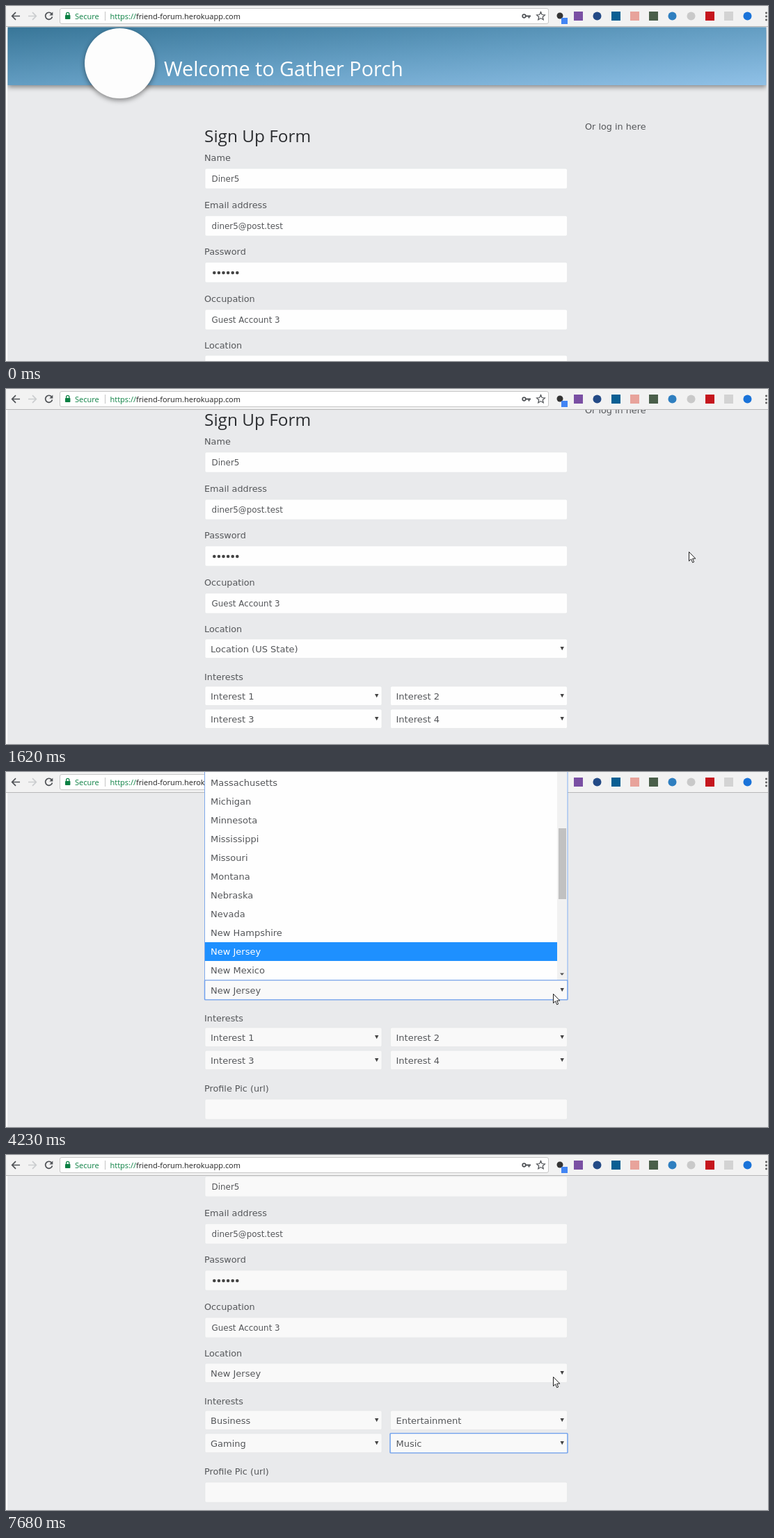
An HTML page that plays this animation: 1095x511 px, repeating every 8000 ms.

```html
<!DOCTYPE html>
<html lang="en">
<head>
<meta charset="utf-8">
<title>Sign up</title>
<style>
  html, body { margin: 0; width: 100%; height: 100%; overflow: hidden; background: #fff; }
  svg { display: block; width: 1095px; height: 511px; }
  text { font-family: "DejaVu Sans", Verdana, sans-serif; fill: #55575a; white-space: pre; }
  .label { font-size: 12.8px; }
  .input { font-size: 11.9px; }
  .select { font-size: 13px; }
  .ui { font: 11px "Open Sans", "Noto Sans", sans-serif; fill: #222; }
  .head { font: 24.4px "Open Sans", "Noto Sans", sans-serif; fill: #2b2d30; }
  .title { font: 28.8px "Open Sans", "Noto Sans", sans-serif; fill: #fff; }
  .secure { fill: #0b8043; }
  .box { stroke: #e2e4e6; stroke-width: .6; }
  .line { fill: none; stroke: #505357; stroke-width: 1.7; }
  .banner, .badge { filter: drop-shadow(0 3px 3.5px rgba(0, 0, 0, .42)); }
  .focus { fill: none; stroke: #6c9fee; stroke-width: 1.4; }
</style>
</head>
<body>
<svg viewBox="0 0 1095 511">
  <defs>
    <linearGradient id="sky" x1="0" y1="0" x2="1" y2="1">
      <stop offset="0" stop-color="#387698"/>
      <stop offset=".5" stop-color="#639dc2"/>
      <stop offset="1" stop-color="#90c1e7"/>
    </linearGradient>
    <clipPath id="view"><rect x="2" y="30" width="1091" height="481"/></clipPath>
  </defs>
  <rect x="2" y="30" width="1093" height="481" fill="#e9eaec"/>
  <g clip-path="url(#view)">
    <g id="page">
      <rect class="banner" x="2.5" y="30.5" width="1090" height="83.5" fill="url(#sky)"/>
      <circle class="badge" cx="163.5" cy="82.5" r="50.5" fill="#fdfdfd"/>
      <text class="title" x="227" y="101">Welcome to Gather Porch</text>
      <text class="label" x="832" y="178">Or log in here</text>
      <text class="head" x="285" y="196">Sign Up Form</text>
    </g>
  </g>

  <g id="toolbar">
    <rect width="1095" height="29" fill="#f2f2f2"/>
    <rect y="29" width="1095" height="1" fill="#b8b8b8"/>
    <rect x="77.5" y="3.5" width="702" height="22" rx="2.5" fill="#fff" stroke="#c6c6c6"/>
    <path class="line" d="M20 14.5H9M14 9.2l-5.3 5.3 5.3 5.3"/>
    <path class="line" style="stroke:#cbcdcf" d="M32 14.5h11M38 9.2l5.3 5.3-5.3 5.3"/>
    <path class="line" d="M65.6 11.2a5 5 0 1 0 .9 4.3"/>
    <path d="M67.3 8.6v5h-5z" fill="#505357"/>
    <rect x="85" y="13" width="7.4" height="6" rx=".7" fill="#0b8043"/>
    <path class="line" style="stroke:#0b8043;stroke-width:1.3" d="M86.6 13v-1.6a2.1 2.1 0 0 1 4.2 0V13"/>
    <text class="ui secure" x="99" y="18.5">Secure</text>
    <path d="M142.5 8v13" stroke="#c4c4c4"/>
    <text class="ui" x="149.5" y="18.5"><tspan class="secure">https://</tspan>friend-forum.herokuapp.com</text>
    <circle class="line" cx="744.5" cy="14.5" r="2.3"/>
    <path class="line" style="stroke-width:2" d="M747 14.5h7M751.5 14.5v3"/>
    <path class="line" style="stroke-width:1.2" d="M768.5 8.6l1.7 3.9 4.2.4-3.2 2.8 1 4.1-3.7-2.2-3.7 2.2 1-4.1-3.2-2.8 4.2-.4z"/>
    <circle cx="796" cy="14" r="4.5" fill="#333"/>
    <rect x="798" y="17" width="9" height="9" fill="#4285f4"/>
    <g fill="#555"><circle cx="1092.5" cy="10" r="1.4"/><circle cx="1092.5" cy="15" r="1.4"/><circle cx="1092.5" cy="20" r="1.4"/></g>
  </g>

  <g id="popup">
    <rect x="285.5" y="-2" width="521.5" height="301.5" fill="#fefefe" stroke="#7fa9ea"/>
    <rect id="pick" x="286" width="506" height="27" fill="#1e90ff"/>
    <rect x="792" width="14" height="299" fill="#f1f1f1"/>
    <rect id="thumb" x="794" width="11" height="102" fill="#c1c1c1"/>
    <path d="M796 289.5h6l-3 3.2z" fill="#505050"/>
  </g>
  <path id="cursor" d="M.5 .5v13.2l3-2.9 2.2 5 2-.9-2.1-4.8h4.2z" fill="#fff" stroke="#222" stroke-width="1"/>
</svg>
<script>
const LOOP = 8000, TICK = 30;
const $ = id => document.getElementById(id);

function add(parent, tag, attrs, text = '') {
  const node = document.createElementNS('http://www.w3.org/2000/svg', tag);
  for (const key in attrs) node.setAttribute(key, attrs[key]);
  node.textContent = text;
  return parent.appendChild(node);
}

// Toolbar buttons: x, colour, shape
[[822, '#7a4fa3', 1], [849, '#234a86', 0], [876, '#0a5f93', 1], [903, '#e8a39b', 1],
 [930, '#4a5f4a', 1], [957, '#2f7fc0', 0], [984, '#c9c9c9', 0], [1011, '#c5161d', 1],
 [1038, '#d3d3d3', 1], [1065, '#1a73d9', 0]].forEach(([x, fill, square]) => {
  if (square) add($('toolbar'), 'rect', { x: x - 6, y: 8, width: 13, height: 13, fill });
  else add($('toolbar'), 'circle', { cx: x + .5, cy: 14.5, r: 6, fill });
});

const page = $('page');
const boxes = add(page, 'g', { class: 'boxes' });
const box = (x, y, width, height) => add(boxes, 'rect', { class: 'box', x, y, width, height, rx: 2 });
const label = (y, text) => add(page, 'text', { class: 'label', x: 285, y }, text);

function field(y, name, value) {
  label(y - 11, name);
  box(286, y, 520.5, 29);
  add(page, 'text', { class: 'input', x: 295.6, y: y + 19 }, value);
}
field(234, 'Name', 'Diner5');
field(302, 'Email address', 'diner5@post.test');
field(369, 'Password', '');
field(437, 'Occupation', 'Guest Account 3');
field(674, 'Profile Pic (url)', '');
for (let i = 0; i < 6; i++) add(page, 'circle', { cx: 299.3 + i * 6.6, cy: 384, r: 2.3, fill: '#444' });
label(493, 'Location');
label(562, 'Interests');

// Each select holds the times at which its text changes.
const selects = [
  { x: 286, y: 503, w: 520.5, steps: [[0, 'Location (US State)'], [3270, 'Nebraska'], [3600, 'Nevada'],
    [3690, 'New Hampshire'], [3810, 'New Jersey'], [3900, 'New Mexico'], [4230, 'New Jersey']] },
  { x: 286, y: 571, w: 254, steps: [[0, 'Interest 1'], [4980, 'Business']] },
  { x: 552.5, y: 571, w: 254, steps: [[0, 'Interest 2'], [5850, 'Education'], [6000, 'Entertainment']] },
  { x: 286, y: 604, w: 254, steps: [[0, 'Interest 3'], [6450, 'Education'], [6570, 'Entertainment'], [6690, 'Gaming']] },
  { x: 552.5, y: 604, w: 254, steps: [[0, 'Interest 4'], [7140, 'Education'], [7260, 'Entertainment'],
    [7350, 'Gaming'], [7680, 'Music']] }
];
for (const s of selects) {
  box(s.x, s.y, s.w, 27.5);
  s.text = add(page, 'text', { class: 'select', x: s.x + 8, y: s.y + 19 });
  add(page, 'path', { d: `M${s.x + s.w - 10} ${s.y + 11}h5.4l-2.7 5.2z`, fill: '#444' });
}
const focusRing = add(page, 'rect', { class: 'focus', height: 28.3, rx: 1 });

const states = ('Florida,Georgia,Hawaii,Idaho,Illinois,Indiana,Iowa,Kansas,Kentucky,Louisiana,Maine,Maryland,' +
  'Massachusetts,Michigan,Minnesota,Mississippi,Missouri,Montana,Nebraska,Nevada,New Hampshire,' +
  'New Jersey,New Mexico').split(',');
const ROWS = 11;
const rows = Array.from({ length: ROWS }, (_, i) =>
  add($('popup'), 'text', { class: 'select', x: 294, y: 20 + i * 27 }));

const focusSteps = [[0, -1], [2670, 0], [4710, 1], [5550, 2], [6210, 3], [6930, 4]];
// [last visible row, highlighted row]
const popupSteps = [[0, null], [2670, [10, -1]], [3270, [18, 18]], [3600, [19, 19]], [3690, [20, 20]],
  [3810, [21, 21]], [3900, [22, 22]], [4230, [22, 21]], [4380, null]];
const scrollKeys = [[930, 0], [1080, 34], [1320, 34], [1455, 87], [1620, 143], [1752, 178], [1860, 203]];
const cursorKeys = [[150, 1070, 84], [240, 981, 234], [1980, 981, 234], [2130, 835, 267],
  [2250, 835, 267], [2370, 786, 319]];

const stepAt = (steps, t) => steps.filter(s => s[0] <= t).pop()[1];

function tween(keys, t) {
  const next = keys.findIndex(k => k[0] > t);
  if (next === 0) return keys[0].slice(1);
  if (next < 0) return keys[keys.length - 1].slice(1);
  const a = keys[next - 1], b = keys[next];
  const p = (t - a[0]) / (b[0] - a[0]);
  return a.slice(1).map((v, i) => Math.round(v + (b[i + 1] - v) * p));
}

const show = (node, on) => { node.style.display = on ? '' : 'none'; };

function render(now) {
  const t = Math.floor(now % LOOP / TICK) * TICK;

  page.setAttribute('transform', `translate(0 ${-tween(scrollKeys, t)[0]})`);
  boxes.setAttribute('fill', t < 1860 ? '#fefefe' : '#f9f9f9');
  for (const s of selects) s.text.textContent = stepAt(s.steps, t);

  const active = selects[stepAt(focusSteps, t)];
  show(focusRing, active);
  if (active) {
    focusRing.setAttribute('x', active.x - .5);
    focusRing.setAttribute('y', active.y - .4);
    focusRing.setAttribute('width', active.w + 1);
  }

  const list = stepAt(popupSteps, t);
  show($('popup'), list);
  if (list) {
    const [last, picked] = list, first = last - ROWS + 1;
    rows.forEach((row, i) => {
      row.textContent = states[first + i];
      row.style.fill = first + i === picked ? '#fff' : '';
    });
    show($('pick'), picked >= 0);
    $('pick').setAttribute('y', 2 + (picked - first) * 27);
    $('thumb').setAttribute('y', Math.round(61 + (last - 18) * 5.1));
  }

  show($('cursor'), t >= 150);
  $('cursor').setAttribute('transform', `translate(${tween(cursorKeys, t)})`);
}

const start = performance.now();
function loop() {
  render(performance.now() - start);
  requestAnimationFrame(loop);
}
loop();
</script>
</body>
</html>
```
